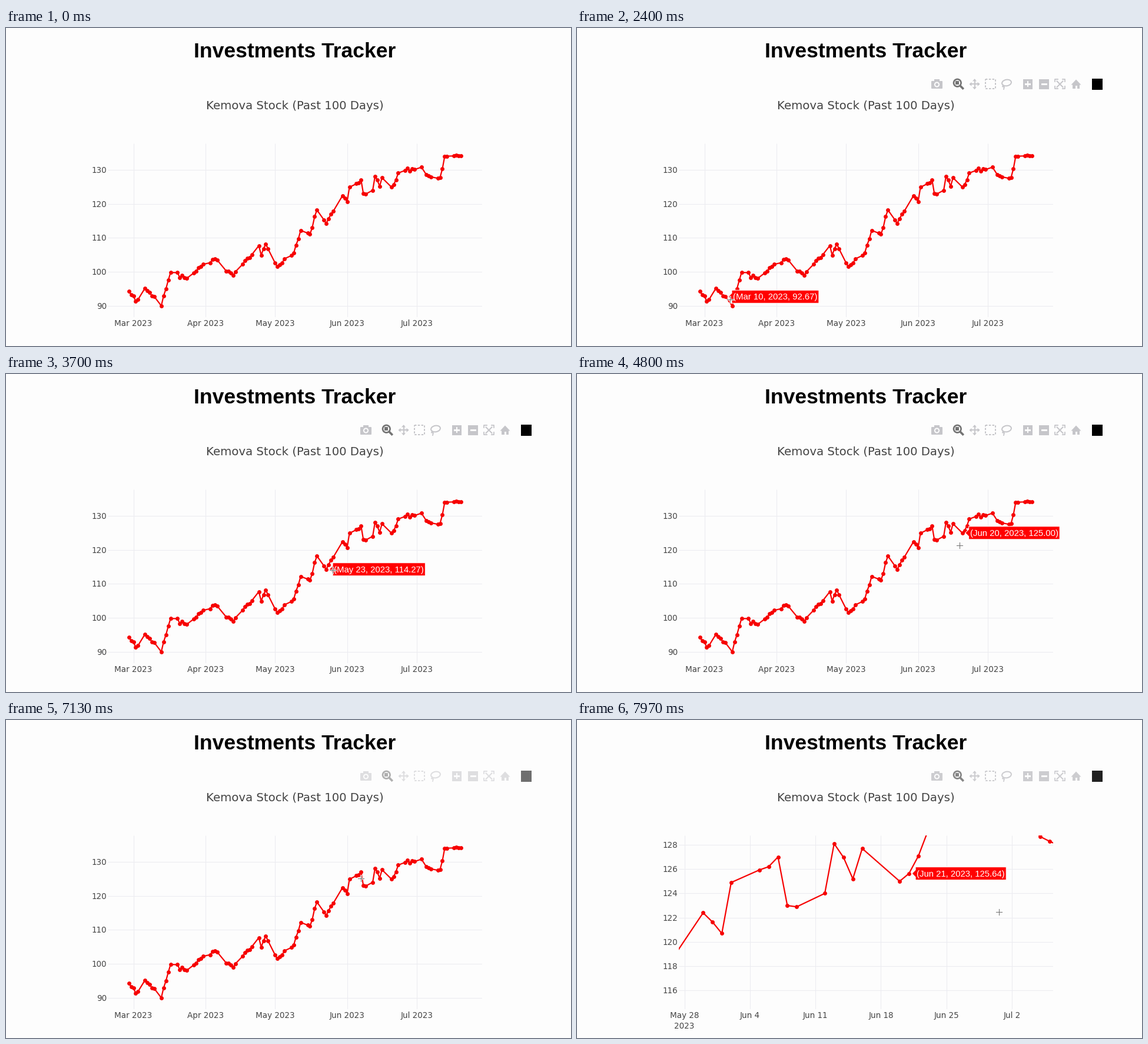
A matplotlib script that plays this animation: 960x540 px, repeating every 8 s.

```python
import numpy as np
import matplotlib.pyplot as plt
from matplotlib.animation import FuncAnimation
from matplotlib.colors import to_rgb
from matplotlib.patches import Circle, Ellipse, FancyBboxPatch, Polygon, Rectangle

W, H, PT = 960, 540, 0.72
FRAMES, STEP = 200, 40

PAPER, INK = "#fdfdfd", "#444444"
GRID, GRID_DIM = "#ececf1", "#848484"
RED, RED_DIM = "#f60000", "#960000"
SHADE = "#969696"
ICON, ICON_ON = "#c6c6ca", "#747474"
LEFT, TOP, RIGHT, BOTTOM = 172.5, 195.5, 809, 490.5

# Turning points of the price; days are counted from 1 March.
KNOTS = np.array([
    (-2, 94.3), (1, 91.4), (5, 95.2), (9, 92.67), (12, 90), (16, 99.8),
    (23, 98.1), (30, 102.2), (35, 103.9), (43, 99), (54, 107.7), (55, 104.9),
    (57, 108.2), (62, 101.5), (69, 105.5), (72, 112.2), (76, 111.1),
    (79, 118.2), (83, 114.27), (90, 122.4), (92, 120.7), (93, 124.9),
    (98, 127), (99, 123), (103, 124), (104, 128.1), (106, 125.2),
    (107, 127.7), (111, 125), (112, 125.64), (114, 129.1), (124, 130.8),
    (127, 128.3), (132, 127.8), (133, 130.31), (134, 134), (141, 134.1)])
HOLIDAYS = {37, 89, 110, 125}
DAYS = np.array([d for d in range(-2, 142)
                 if (d + 2) % 7 < 5 and d not in HOLIDAYS])
WOBBLE = np.random.default_rng(4).normal(0, 0.3, len(DAYS))
PRICES = np.interp(DAYS, *KNOTS.T) + np.where(np.isin(DAYS, KNOTS[:, 0]), 0, WOBBLE)
MONTHS = {"Feb": -28, "Mar": 0, "Apr": 31, "May": 61, "Jun": 92, "Jul": 122}

# Times in ms.
ENTER, PRESS, BOX_AT, ZOOM_AT = 840, 6983, 7170, 7770
BAR_IN, BAR_OUT, FADE, LAG = 640, 7045, 300, 40
HOVER_RADIUS = 23

# Where the pointer turns: time, x, y.
LOW, HIGH = (248, 466), (658, 288)
TURNS = np.array([
    (ENTER, 612, 490), (1600, *HIGH), (2280, *LOW), (3360, *HIGH),
    (4300, 262, 460), (4850, *HIGH), (5360, *LOW), (5760, 733, 237),
    (6360, *LOW), (PRESS, 561.3, 248), (7377, 717.5, 326), (8000, 717, 326)])
ANCHOR = TURNS[-3, 1:]


def fade(t, start, length=FADE):
    u = np.clip((t - start) / length, 0, 1)
    return 1 - (1 - u) ** 2


def mix(a, b, u):
    return tuple(np.array(to_rgb(a)) * (1 - u) + np.array(to_rgb(b)) * u)


def date_name(day):
    name = [m for m, start in MONTHS.items() if start <= day][-1]
    return f"{name} {day - MONTHS[name] + 1}"


def pointer(t):
    i = np.clip(np.searchsorted(TURNS[:, 0], t, "right") - 1, 0, len(TURNS) - 2)
    (t0, *a), (t1, *b) = TURNS[i], TURNS[i + 1]
    u = np.clip((t - t0) / (t1 - t0), 0, 1)
    return np.array(a) + (np.array(b) - a) * (1 - np.cos(np.pi * u)) / 2


fig = plt.figure(figsize=(W / 100, H / 100), dpi=100, facecolor=PAPER)
ax = fig.add_axes([0, 0, 1, 1])
ax.set_xlim(0, W)
ax.set_ylim(H, 0)
ax.axis("off")


def words(x, y, s, px, color=INK, font="DejaVu Sans", **kw):
    return ax.text(x, y, s, fontsize=px * PT, color=color, family=font, **kw)


def box(x0, y0, x1, y1, color, z=5):
    return ax.add_patch(Rectangle((x0, y1), x1 - x0, y0 - y1,
                                  fc=color, lw=0, zorder=z))


def disc(x, y, r, color, z=5):
    return ax.add_patch(Circle((x, y), r, fc=color, lw=0, zorder=z))


def poly(points, color, z=5, edge="none", lw=0):
    return ax.add_patch(Polygon(points, fc=color, ec=edge, lw=lw * PT, zorder=z))


def stroke(xs, ys, color, lw, z=5, **kw):
    return ax.plot(xs, ys, color=color, lw=lw * PT, zorder=z, **kw)[0]


class View:
    """Price line, grid and tick labels for one zoom level."""

    def __init__(self, x0, per_day, y100, per_unit, xticks, yticks, z=2, named=True):
        self.px = x0 + per_day * DAYS
        self.py = y100 - per_unit * (PRICES - 100)
        gx = [x0 + per_day * d for d in xticks]
        gy = [y100 - per_unit * (v - 100) for v in yticks]
        self.grids = [ax.vlines(gx, TOP, BOTTOM, color=GRID, lw=1.1 * PT, zorder=z),
                      ax.hlines(gy, LEFT, RIGHT, color=GRID, lw=1.1 * PT, zorder=z)]
        self.line = stroke(self.px, self.py, RED, 2.2, z + 0.5, marker="o",
                           ms=6.9 * PT, mew=0, solid_joinstyle="round")
        self.labels = []
        if named:
            for x, s in zip(gx, xticks.values()):
                for i, row in enumerate(s.split("\n")):
                    self.labels.append(words(x, 506 + 17.5 * i, row, 13.5, ha="center"))
            for y, v in zip(gy, yticks):
                self.labels.append(words(171.5, y + 5, str(v), 13.5, ha="right"))

    def clip(self, patch):
        for a in self.grids + [self.line]:
            a.set_clip_path(patch)

    def tint(self, u):
        for g in self.grids:
            g.set_color(mix(GRID, GRID_DIM, u))
        self.line.set_color(mix(RED, RED_DIM, u))

    def show(self, on):
        for a in self.grids + [self.line] + self.labels:
            a.set_visible(on)


def draw_icons(cy=95.3):
    # camera
    ax.add_patch(FancyBboxPatch((603, 91), 17, 11, boxstyle="round,pad=1",
                                fc=ICON, lw=0, zorder=5))
    box(607, 87, 616, 91, ICON)
    disc(611.5, 96, 4.6, PAPER, 6)
    disc(611.5, 96, 2.6, ICON, 7)
    # magnifier
    disc(646.3, 93.2, 7.6, ICON_ON)
    disc(646.3, 93.2, 4.9, PAPER, 6)
    box(643.2, 90.2, 649.4, 96.2, ICON_ON, 7)
    stroke([651, 655.5], [98, 102.5], ICON_ON, 3.6)
    # four-way arrow
    cx = 675.5
    for a, b in ((1, 0), (-1, 0), (0, 1), (0, -1)):
        stroke([cx, cx + 7 * a], [cy, cy + 7 * b], ICON, 2)
        poly([(cx + 9 * a, cy + 9 * b),
              (cx + 5 * a - 3.5 * b, cy + 5 * b + 3.5 * a),
              (cx + 5 * a + 3.5 * b, cy + 5 * b - 3.5 * a)], ICON)
    # dashed box
    stroke([694, 711, 711, 694, 694], [87, 87, 103, 103, 87], ICON, 2,
           dashes=(1.7, 1.2))
    # lasso
    ax.add_patch(Ellipse((730, 93), 16, 10.5, angle=-10, fc="none",
                         ec=ICON, lw=2 * PT, zorder=5))
    stroke([724, 723, 726, 725], [97, 99.5, 100, 104], ICON, 1.8)
    # plus and minus
    for x in (766, 793.5):
        box(x - 8.2, cy - 8.2, x + 8.2, cy + 8.2, ICON)
        box(x - 5, cy - 1.4, x + 5, cy + 1.4, PAPER, 6)
    box(764.6, cy - 5, 767.4, cy + 5, PAPER, 6)
    # expand
    cx = 820.5
    for a in (-1, 1):
        stroke([cx - 5, cx + 5], [cy - 5 * a, cy + 5 * a], ICON, 2)
        for b in (-1, 1):
            stroke([cx + 4 * a, cx + 8.5 * a, cx + 8.5 * a],
                   [cy + 8 * b, cy + 8 * b, cy + 4 * b], ICON, 1.8)
    # house
    poly([(839.5, 96.5), (848, 87.5), (856.5, 96.5)], ICON)
    box(842.3, 95, 853.7, 103, ICON)
    box(846.5, 98, 849.5, 103, PAPER, 6)
    # plain badge
    box(875, 86, 893, 104.5, "black")


words(490.5, 50, "Investments Tracker", 35.5, "black", "Liberation Sans",
      weight="bold", ha="center")
words(490.5, 138.5, "Kemova Stock (Past 100 Days)", 19.8, ha="center")
draw_icons()
veil = box(597, 82, 898, 108, PAPER, 9)

months = {d: f"{m} 2023" for m, d in MONTHS.items() if d >= 0}
weeks = {d: date_name(d) for d in range(88, 124, 7)}
weeks[88] += "\n2023"
WIDE = (216.5, 3.947, 414, 5.767, months, range(90, 131, 10))
full = View(*WIDE)
lit = View(*WIDE, z=4, named=False)
zoomed = View(-1216.7, 15.9, 789.1, 20.61, weeks, range(116, 129, 2))

plot_area = box(LEFT, TOP, RIGHT, BOTTOM, "none", 0)
full.clip(plot_area)
zoomed.clip(plot_area)

shade = box(LEFT, TOP, RIGHT, BOTTOM, SHADE, 1)
hole = box(0, 0, 1, 1, PAPER, 3.5)
corners = [poly([(0, 0)] * 6, "white", 6, INK, 1) for _ in range(4)]

tag = poly([(0, 0)] * 7, "#ff0000", 10, "white", 1)
tag_text = words(0, 0, "", 14.9, "white", "Liberation Sans", zorder=11)
cross = [stroke([], [], color, lw, z) for color, lw, z in
         (("white", 2.6, 12), ("#777777", 1.1, 13)) for _ in range(2)]


def bar_level(t):
    return fade(t, BAR_IN) - fade(t, BAR_OUT) + fade(t, ZOOM_AT)


def hovered(t, x, y):
    """Index of the point whose tag is open, or None."""
    if t >= ZOOM_AT:
        return int(np.searchsorted(DAYS, 112))
    if t < ENTER or t >= PRESS:
        return None
    dist = np.hypot(full.px - x, full.py - y)
    best = int(dist.argmin())
    return best if dist[best] < HOVER_RADIUS else None


def place_tag(view, i):
    tag.set_visible(i is not None)
    tag_text.set_visible(i is not None)
    if i is None:
        return
    x, y = view.px[i], view.py[i]
    tag_text.set_text(f"({date_name(DAYS[i])}, 2023, {PRICES[i]:.2f})")
    tag_text.set_position((x + 13, y + 5.2))
    wide = tag_text.get_window_extent(fig.canvas.get_renderer()).width
    x0, x1 = x + 11, x + 15.5 + wide
    tag.set_xy([(x + 5, y), (x0, y - 6), (x0, y - 11), (x1, y - 11),
                (x1, y + 11), (x0, y + 11), (x0, y + 6)])


def place_box(t):
    on = BOX_AT <= t < ZOOM_AT
    for a in [shade, hole] + corners:
        a.set_visible(on)
    lit.show(on)
    dim = fade(t, BOX_AT, 140) if on else 0
    full.tint(dim)
    if not on:
        return
    shade.set_alpha(dim)
    (x0, y0), (x1, y1) = ANCHOR, pointer(t - LAG)
    hole.set_bounds(x0, y1, x1 - x0, y0 - y1)
    lit.clip(hole)
    ends = [(x, y, a, b) for x, a in ((x0, -1), (x1, 1))
            for y, b in ((y0, -1), (y1, 1))]
    for c, (x, y, a, b) in zip(corners, ends):
        c.set_xy([(x + 4 * a, y + 4 * b), (x - 11 * a, y + 4 * b),
                  (x - 11 * a, y + b), (x + a, y + b),
                  (x + a, y - 10 * b), (x + 4 * a, y - 10 * b)])


def update(frame):
    t = frame * STEP
    is_zoomed = t >= ZOOM_AT
    full.show(not is_zoomed)
    zoomed.show(is_zoomed)
    veil.set_alpha(1 - bar_level(t))

    x, y = pointer(t)
    for k, arm in enumerate(cross):
        arm.set_visible(t >= ENTER)
        dx, dy = (5, 0) if k % 2 else (0, 5)
        arm.set_data([x - dx, x + dx], [y - dy, y + dy])
    place_tag(zoomed if is_zoomed else full, hovered(t, x, y))
    place_box(t)
    return []


anim = FuncAnimation(fig, update, frames=FRAMES, interval=STEP,
                     init_func=lambda: update(0), repeat=True,
                     repeat_delay=0, blit=False)
plt.show()
```
